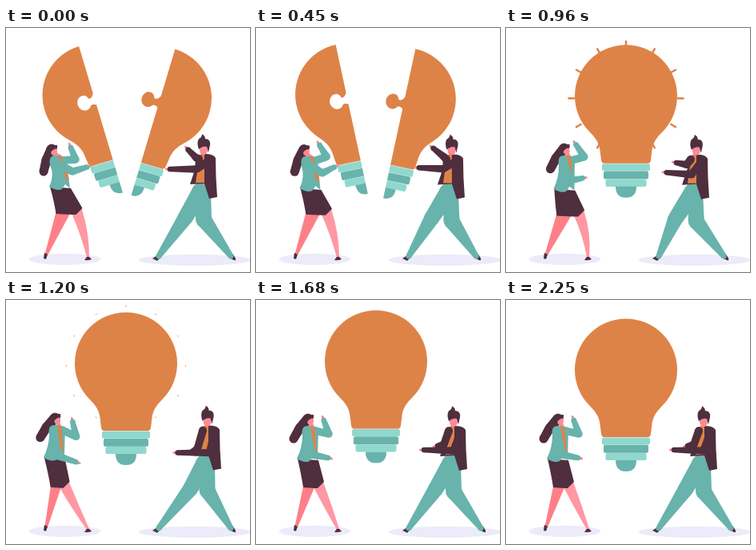
Write an HTML page with a canvas that moves like this. It is 305x306 px and loops after 2730 ms.

```html
<!DOCTYPE html>
<html lang="en">
<head>
<meta charset="utf-8">
<title>Light bulb teamwork</title>
<style>
html, body { margin: 0; width: 100%; height: 100%; overflow: hidden; background: #fff; }
canvas { display: block; width: 305px; height: 306px; }
</style>
</head>
<body>
<canvas></canvas>
<script>
const ORANGE = '#de8348', TEAL = '#68b3ac', MINT = '#90d8cd', DARK = '#4f2e3e';
const SKIN = '#fe8a95', SHADOW = '#ebebf9';
const LOOP = 2730, MOVE_END = 2250, STEP = 30;

const canvas = document.querySelector('canvas');
const ctx = canvas.getContext('2d');
const dpr = window.devicePixelRatio || 1;
canvas.width = 305 * dpr;
canvas.height = 306 * dpr;

// Each joint: holding a half, pushing it in, at rest (same as holding if left out).
const WOMAN = {
  face: [[60, 155], [87, 157], [68, 152]],
  hair: [[47, 180], [68, 181], [47, 174]],
  chest: [[65, 167], [88, 170], [68, 165]],
  waist: [[68, 201], [86, 208], [65, 201]],
  hem: [[79, 231], [94, 234], [72, 233]],
  highArm: [[87, 165], [108, 152], [91, 168]],
  highHand: [[79, 145], [87, 136], [83, 146]],
  lowArm: [[83, 180], [98, 187], [70, 194]],
  lowHand: [[106, 173], [109, 170], [95, 199]]
};
const MAN = {
  face: [[247, 153], [224, 155]],
  chest: [[250, 171], [225, 173]],
  waist: [[244, 205], [219, 207]],
  highArm: [[238, 163], [212, 157], [235, 181]],
  highHand: [[224, 149], [187, 144], [222, 184]],
  lowArm: [[238, 177], [209, 176], [247, 189]],
  lowHand: [[200, 177], [182, 170], [205, 188]],
  leftKnee: [[224, 238], [193, 242]],
  rightKnee: [[247, 240], [224, 246]]
};

// Each half: direction, distance from centre, extra pull back, lift, extra lift.
const LEFT = { side: -1, gap: 31.5, pull: 10, lift: -4.5, extra: -2 };
const RIGHT = { side: 1, gap: 34, pull: 6, lift: -1, extra: 2 };

const BULB = 'M104 132A64 64 0 1 1 196 132C188 140 183 146 182 160L181 168q-.5 4-4 4H123q-3.5 0-4-4L118 160C117 146 112 140 104 132z';
const SEAM = 'M150 220V100Q146 97 143 99Q141 103 136 103A8.500 9.500 0 0 1 136 84Q141 84 143 90Q147 91 150 85V0';

const ease = u => (1 - Math.cos(Math.PI * Math.min(1, Math.max(0, u)))) / 2;

// Phases: gap still open, pull back, and step back with a small overshoot.
const openness = t => 1 - ease((t - 290) / 460);
const pullBack = t => ease(t / 250) * openness(t);
const stepBack = t => 1.2 * ease((t - 720) / 480) - 0.2 * ease((t - 1200) / 300);

function poseAt(joints, t, sway) {
  const push = 1 - openness(t), rest = stepBack(t), pose = {};
  for (const name in joints) {
    const [a, b, c = a] = joints[name];
    const [x, y] = a.map((v, i) => v + (b[i] - v) * push + (c[i] - b[i]) * rest);
    pose[name] = [x + sway * pullBack(t), y];
  }
  return pose;
}

function shape(color, d, x = 0, y = 0) {
  ctx.save();
  ctx.translate(x, y);
  ctx.fillStyle = color;
  ctx.fill(new Path2D(d));
  ctx.restore();
}

function oval(color, x, y, rx, ry) {
  ctx.fillStyle = color;
  ctx.beginPath();
  ctx.ellipse(x, y, rx, ry, 0, 0, 7);
  ctx.fill();
}

function poly(color, ...p) {
  shape(color, 'M' + p.join(' ') + 'z');
}

// Tapered limb through joints given as [x, y, width].
function limb(color, ...joints) {
  joints.forEach(([x, y, w], i) => {
    oval(color, x, y, w / 2, w / 2);
    if (!i) return;
    const [px, py, pw] = joints[i - 1];
    const len = Math.hypot(x - px, y - py) || 1;
    const nx = (py - y) / len / 2, ny = (x - px) / len / 2;
    poly(color, px + nx * pw, py + ny * pw, x + nx * w, y + ny * w,
      x - nx * w, y - ny * w, px - nx * pw, py - ny * pw);
  });
}

function arm(color, sx, sy, [ex, ey], [hx, hy]) {
  const f = Math.max(0, 1 - 5 / Math.hypot(hx - ex, hy - ey));
  const cx = ex + (hx - ex) * f, cy = ey + (hy - ey) * f;
  limb(SKIN, [cx, cy, 4], [hx, hy, 2.5]);
  limb(color, [sx, sy, 10], [ex, ey, 9.5], [cx, cy, 6.5]);
}

function bulb() {
  shape(ORANGE, BULB);
  [[60, 9], [56, 10], [51, 9]].reduce((y, [w, h], i) => {
    ctx.fillStyle = i % 2 ? TEAL : MINT;
    ctx.beginPath();
    ctx.roundRect(150 - w / 2, y, w, h, 2);
    ctx.fill();
    return y + h + 0.3;
  }, 172.5);
  shape(TEAL, 'M137 201h26q0 14-13 14t-13-14z');
}

function halfBulb({ side, gap, pull, lift, extra }, t) {
  const open = openness(t), back = pullBack(t);
  ctx.save();
  ctx.translate(150 + side * (gap * open + pull * back), 119 + lift * open + extra * back);
  ctx.rotate(side * open * 0.29);
  ctx.translate(-150, -119);
  ctx.clip(new Path2D(SEAM + `H${150 + side * 90}V220z`));
  bulb();
  ctx.restore();
}

function rays(t, cy) {
  const u = (t - 800) / 300;
  if (u <= 0 || t > 1215) return;
  const outer = 64 + 11 * (1 - (1 - Math.min(1, u)) ** 2);
  const inner = Math.min(outer, 64 + 11 * Math.max(0, (t - 960) / 255));
  ctx.strokeStyle = ORANGE;
  ctx.lineWidth = 2.5;
  ctx.beginPath();
  for (let i = 0; i < 12; i++) {
    const c = Math.cos(i * Math.PI / 6), s = Math.sin(i * Math.PI / 6);
    ctx.moveTo(150 + c * inner, cy + s * inner);
    ctx.lineTo(150 + c * outer, cy + s * outer);
  }
  ctx.stroke();
}

function drawBulb(t) {
  if (t < 705) {
    halfBulb(LEFT, t);
    halfBulb(RIGHT, t);
    return;
  }
  const rise = t < 750 ? 0 : 12.2 * ease(1 - Math.abs(t - 1500) / 750);
  rays(t, 90.5 - rise);
  ctx.save();
  ctx.translate(0, -rise);
  bulb();
  ctx.restore();
  if (t < 750) {
    ctx.strokeStyle = '#fff';
    ctx.lineWidth = 1;
    ctx.stroke(new Path2D('M150 22v6M126.500 93Q126 103 135 104Q141 102 143 98.500Q146 97 150 100'));
  }
}

function drawWoman(t) {
  const p = poseAt(WOMAN, t, -6);
  const [fx, fy] = p.face, [sx, sy] = p.chest, [wx, wy] = p.waist, [hx, hy] = p.hem, [tx, ty] = p.hair;
  // The skirt widens as the hips move forward.
  const flare = Math.max(-1, (hx - 72) * 0.5), b = 13 + flare, hip = hx + b;
  shape('#ff7f88', `M${hx - b + 1} ${hy - 4}L48.500 284L52 285L${hx + 2} ${hy}z`);
  shape('#ff98a2', `M${hip - 14} ${hy}Q${(hip + 87) / 2 + flare} 262 101 288L104 287Q${(hip + 105) / 2 + flare * 1.2} 258 ${hip - 1} ${hy - 5}z`);
  shape(DARK, 'M48 282l4 2-2 6-3-1z');
  shape(DARK, 'M98 291l3-4 3 0 3 3q-4 2-9 1z');
  shape(DARK, `M${wx - 13} ${wy - 2}L${wx + 13} ${wy}L${hip} ${hy - 5}L${hip - 8} ${hy + 3}Q${hx} ${hy + 3} ${hx - b} ${hy + 2}Q${hx - b - 2} ${hy - 12} ${wx - 13} ${wy - 2}z`);
  limb(DARK, [fx - 3, fy - 3, 13], [(fx + tx) / 2 - 3, (fy + ty) / 2 - 2, 12], [tx, ty, 11]);
  limb(SKIN, [fx, fy + 2, 5], [sx + 3, sy - 5, 5]);
  oval(SKIN, fx, fy, 4, 5);
  shape(DARK, 'M-5 3Q-3-3 4-4L4-8Q-3-9-6-4z', fx, fy);
  arm(TEAL, sx + 6, sy - 1, p.highArm, p.highHand);
  shape(TEAL, `M${sx - 4} ${sy - 7}Q${sx - 12} ${sy - 7} ${sx - 10} ${sy + 5}Q${wx - 7} ${wy - 16} ${wx - 14} ${wy - 2}Q${wx - 4} ${wy + 4} ${wx + 2} ${wy + 1}L${wx + 6} ${wy - 5}L${wx + 12} ${wy}L${sx + 10} ${sy - 4}L${sx + 3} ${sy - 7}z`);
  poly(ORANGE, sx, sy - 7, sx + 5, sy - 5, wx + 11, wy - 11, wx + 7, wy - 11);
  arm(TEAL, sx - 4, sy + 1, p.lowArm, p.lowHand);
}

function drawMan(t) {
  const p = poseAt(MAN, t, 5);
  const [fx, fy] = p.face, [sx, sy] = p.chest, [wx, wy] = p.waist;
  // The right foot steps forward with the push.
  const foot = 284 - 22 * (1 - openness(t) - Math.min(1, stepBack(t)));
  shape(DARK, 'M-4 2L0-3L3 2L3 4Q1 5-1 3z', foot, 287);
  shape(DARK, 'M188 286l4 3-3 3-6-3z');
  limb(TEAL, [wx + 3, wy, 18], [...p.rightKnee, 20], [foot - 3, 286, 7]);
  limb(TEAL, [wx, wy, 23], [...p.leftKnee, 19], [191, 286, 7]);
  limb(SKIN, [fx, fy + 2, 5], [sx - 4, sy - 10, 6]);
  shape(DARK, `M${sx - 8} ${sy - 12}Q${sx - 15} ${sy - 8} ${sx - 13} ${sy + 4}L${wx - 14} ${wy - 9}L${wx + 4} ${wy - 10}L${wx + 10} ${wy + 9}L${wx + 20} ${wy + 7}Q${wx + 18} ${sy + 16} ${sx + 12} ${sy - 8}Q${sx + 9} ${sy - 13} ${sx} ${sy - 13}z`);
  poly(ORANGE, sx - 8, sy - 12, sx - 2, sy - 13, wx + 4, wy - 11, wx - 7, wy - 11);
  arm(DARK, sx - 9, sy - 7, p.highArm, p.highHand);
  oval(SKIN, fx, fy, 5, 6);
  shape(DARK, 'M-6-1Q-9-9-6-14Q-2-16-2-20Q2-18 2-14Q9-14 8-6L6 3L4-4Q-1-6-6-1z', fx, fy);
  arm(DARK, sx + 6, sy - 6, p.lowArm, p.lowHand);
}

function draw(now) {
  const t = Math.min(MOVE_END, Math.floor(now % LOOP / STEP) * STEP);
  ctx.setTransform(dpr, 0, 0, dpr, 0, 0);
  ctx.fillStyle = '#fff';
  ctx.fillRect(0, 0, 305, 306);
  oval(SHADOW, 73.5, 290, 45, 7);
  oval(SHADOW, 236, 291, 70, 7);
  drawBulb(t);
  drawWoman(t);
  drawMan(t);
}

let start;
function tick(now) {
  start ??= now;
  draw(now - start);
  requestAnimationFrame(tick);
}
draw(0);
requestAnimationFrame(tick);
</script>
</body>
</html>
```
